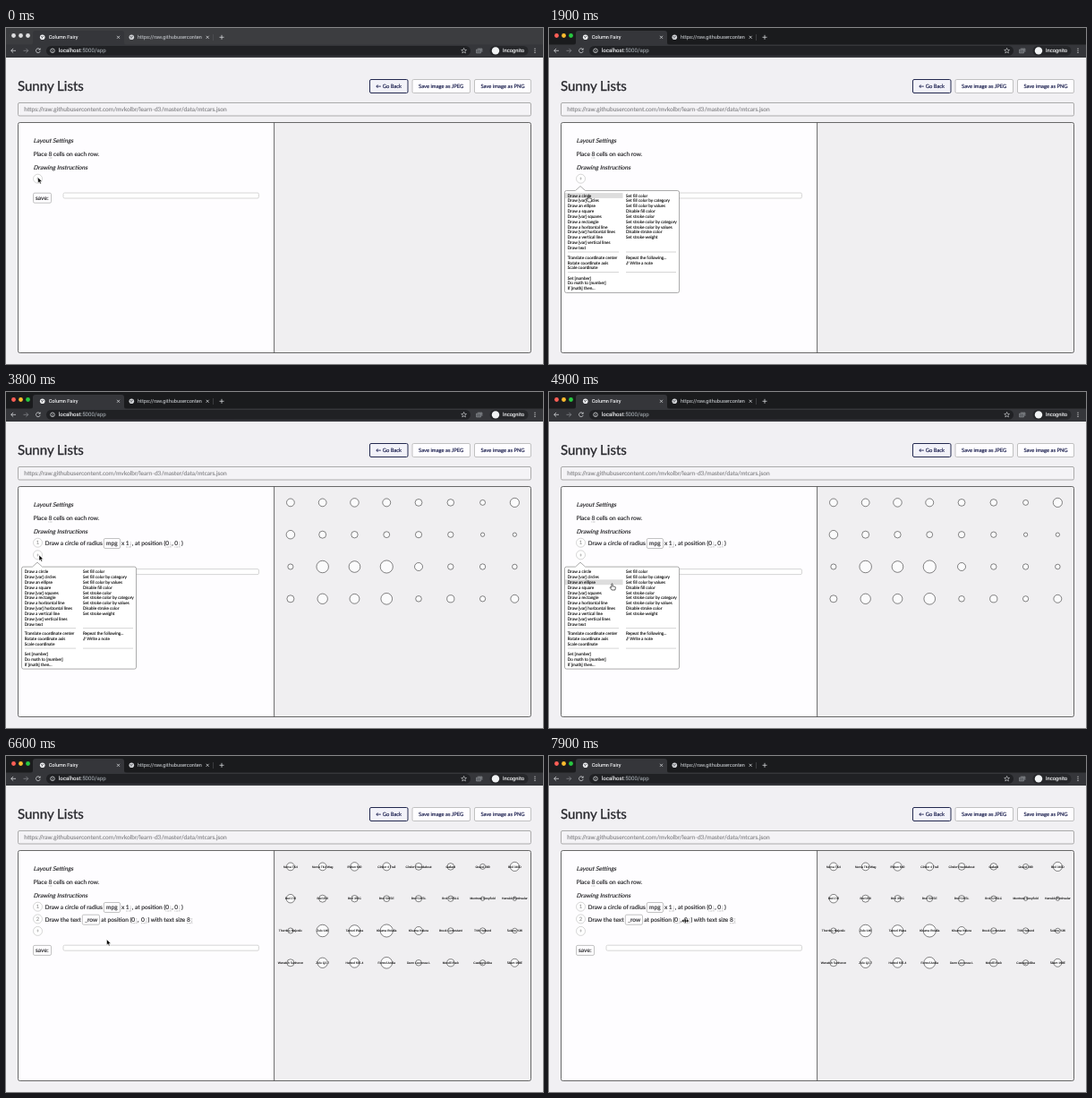
Write an HTML page that moves like this. It is 600x375 px and loops after 8 s.

```html
<!DOCTYPE html>
<html lang="en">
<head>
<meta charset="utf-8">
<title>Column Fairy</title>
<style>
  html, body { margin: 0; width: 100%; height: 100%; overflow: hidden; background: #f1f0f3; }
  svg { display: block; width: 600px; height: 375px; }
  text {
    font: 6.62px Lato, sans-serif; color: #1c1c1f; fill: currentColor; stroke: currentColor; stroke-width: .12;
    text-rendering: geometricPrecision; white-space: pre;
  }
  .ui text { font: 5.6px Roboto, sans-serif; color: #f1f2f4; }
  .ui .dim { fill: #9aa0a6; stroke: #9aa0a6; }
  .ui .addr { font-size: 6.1px; }
  .icon { fill: none; stroke: #d5d7da; stroke-width: .8; }
  .title { font-size: 15px; color: #26262b; stroke-width: .3; }
  .button { font-size: 5.833px; color: #1d2150; text-anchor: middle; stroke-width: .18; }
  .head { transform: skewX(-14deg); transform-box: fill-box; transform-origin: 0 80%; }
  .box { fill: #fefdff; stroke: #aaa; stroke-width: .7; }
  .ring { fill: #fff; stroke: #bbb; stroke-width: .6; }
  .mark { color: #999; font-size: 6px; text-anchor: middle; }
  .under { stroke: #777; stroke-width: .6; stroke-dasharray: .7 .7; }
  #menu text { font-size: 4.667px; color: #111; }
  #circles circle { fill: #fbfbfc; stroke: #222; stroke-width: .55; }
  #labels text { font: 3.333px "Liberation Sans", Arial, sans-serif; color: #000; text-anchor: middle; stroke-width: .08; }
</style>
</head>
<body>
<svg viewBox="0 0 600 375">
  <g class="ui">
    <rect id="bar" width="600" height="19"/>
    <path d="M27 19q3 0 3-3V6q0-3 3-3h96q3 0 3 3v10q0 3 3 3z" fill="#35363a"/>
    <rect y="18.5" width="600" height="14.5" fill="#35363a"/>
    <g id="lights"><circle cx="8.5" cy="8.5" r="2.4"/><circle cx="16.5" cy="8.5" r="2.4"/><circle cx="24.5" cy="8.5" r="2.4"/></g>
    <circle cx="40.7" cy="10.3" r="2.8" fill="#f1f2f4"/><circle cx="140.3" cy="10.3" r="2.8" fill="#d4d6d9"/>
    <path d="M39 9.4l1.6.6-.4 1.6M42 8.8l-.6 1.2M138.6 9.4l1.6.6-.4 1.6M141.6 8.8l-.6 1.2" fill="none" stroke="#45474c" stroke-width=".8"/>
    <text x="47.7" y="12.3">Column Fairy</text>
    <text x="147" y="12.3" style="color:#b4b7bb">https://raw.githubuserconten</text>
    <path class="icon" d="M124 8.8l3 3m0-3l-3 3M223.700 8.800l3 3m0-3l-3 3M238.500 10.300h5m-2.500-2.500v5"/>
    <path d="M231.500 7v7" stroke="#5a5c60" stroke-width=".5"/>
    <path class="icon" d="M11 25.300H5.700m2.400-2.400l-2.400 2.400 2.400 2.400M37.800 23.800a2.400 2.400 0 1 0 .4 2M38.200 22.600v1.600h-1.600"/>
    <path class="icon" style="stroke:#85878c" d="M19.500 25.300h5.300m-2.400-2.400l2.400 2.400-2.400 2.400"/>
    <rect x="45" y="20" width="474" height="10.800" rx="5.400" fill="#202124"/>
    <circle class="icon" cx="52" cy="25.300" r="2.300"/><path class="icon" d="M52 25v1.500M52 23.700v.5"/>
    <text class="addr" x="58.800" y="27.400">localhost<tspan class="dim">:5000/app</tspan></text>
    <path class="icon" style="stroke-width:.6" d="M511.600 22.400l.8 2 2.100.1-1.600 1.400.5 2.100-1.800-1.200-1.800 1.200.5-2.100-1.600-1.400 2.100-.1z"/>
    <path d="M526.800 23h5.200v3.800M525.500 24h5v4h-5z" fill="#5f6267" stroke="#8a8d92" stroke-width=".6"/>
    <rect x="540.500" y="20" width="43" height="10.800" rx="5.400" fill="#26272a"/>
    <circle cx="547" cy="25.400" r="4.200" fill="#f1f3f4"/>
    <text x="555" y="27.400" style="font-size:5.800px">Incognito</text>
    <g fill="#e4e5e7"><circle cx="591" cy="23.200" r=".6"/><circle cx="591" cy="25.300" r=".6"/><circle cx="591" cy="27.400" r=".6"/></g>
  </g>

  <text class="title" x="13" y="70.300">Sunny Lists</text>
  <rect x="406.500" y="57.500" width="42.500" height="15" rx="1.500" fill="#f2f2f9" stroke="#23284f"/>
  <rect class="box" x="454" y="57.500" width="64.500" height="15" rx="1.500"/>
  <rect class="box" x="523.500" y="57.500" width="63" height="15" rx="1.500"/>
  <text class="button" x="427.700" y="67">← Go Back</text>
  <text class="button" x="486.200" y="67">Save image as JPEG</text>
  <text class="button" x="555" y="67">Save image as PNG</text>
  <rect x="13.500" y="83.500" width="573" height="14.500" rx="1.500" fill="#f4f3f6" stroke="#999" stroke-width=".8"/>
  <text x="20.300" y="93.200" style="color:#858588">https://raw.githubusercontent.com/mvkolbr/learn-d3/master/data/mtcars.json</text>

  <rect x="13.500" y="105.500" width="573" height="257" rx="2" fill="#f0eff1"/>
  <path d="M299.600 105.500H15.500q-2 0-2 2V360.500q0 2 2 2H299.600z" fill="#fefdff"/>
  <rect x="13.500" y="105.500" width="573" height="257" rx="2" fill="none" stroke="#444" stroke-width=".8"/>
  <path d="M299.600 105.500v257" stroke="#444" stroke-width=".8"/>
  <text class="head" x="30.500" y="128.200">Layout Settings</text>
  <text x="30.500" y="143.300">Place 8 cells on each row.</text>
  <path class="under" d="M47.500 145h4.500"/>
  <text class="head" x="30.500" y="158.300">Drawing Instructions</text>

  <g id="step1">
    <circle class="ring" cx="35.500" cy="168.200" r="5"/><text class="mark" x="35.500" y="170.400">1</text>
    <rect class="box" x="109.300" y="163.500" width="18.200" height="11" rx="1.500"/>
    <text y="171.300"><tspan x="43.500">Draw a circle of radius</tspan><tspan x="112">mpg</tspan><tspan x="129">x</tspan><tspan x="133.800">1</tspan><tspan x="140.800">, at position (</tspan><tspan x="178.300">0</tspan><tspan x="185.300">,</tspan><tspan x="188.300">0</tspan><tspan x="196">)</tspan></text>
    <path class="under" d="M134 173h6M178.500 173h6M188.500 173h6M139.300 167.500v5M183.800 167.500v5M193.800 167.500v5"/>
  </g>
  <g id="step2">
    <circle class="ring" cx="35.500" cy="181.900" r="5"/><text class="mark" x="35.500" y="184.100">2</text>
    <rect class="box" x="85.300" y="177.200" width="19.200" height="11" rx="1.500"/>
    <text y="185"><tspan x="43.500">Draw the text</tspan><tspan x="88">_row</tspan><tspan x="106.300">at position (</tspan><tspan x="140.300">0</tspan><tspan x="147">,</tspan><tspan x="151">0</tspan><tspan x="158.500">) with text size</tspan><tspan x="202">8</tspan></text>
    <path class="under" d="M140.500 186.700h6M151.300 186.700h6M202.300 186.700h6M145.800 181.200v5M156.700 181.200v5M207.600 181.200v5"/>
  </g>
  <g id="tail">
    <circle class="ring" cx="35.500" cy="168.200" r="5"/><text class="mark" x="35.500" y="170.300">+</text>
    <rect class="box" x="30.500" y="184.200" width="20" height="11" rx="1.500"/><text x="33" y="191.800">save:</text>
    <rect x="64" y="184" width="218.500" height="6" rx="1.500" fill="#fff" stroke="#ccc" stroke-width=".8"/>
  </g>
  <g id="circles"></g>
  <g id="labels"></g>
  <g id="menu">
    <path d="M19.500 181.500H29.500L35 176.500 40.500 181.500H143.500q2 0 2 2V293.500q0 2-2 2H19.500q-2 0-2-2V183.500q0-2 2-2z" fill="#fff" stroke="#888" stroke-width=".7"/>
    <rect id="hover" x="18" width="64.500" height="5.833" fill="#ddd"/>
    <path d="M21 250h57M86 250h56M21 272.500h57M86 272.500h56" stroke="#bbb" stroke-width=".6"/>
  </g>
  <g id="cursor" stroke-linejoin="round">
    <path id="arrow" d="M0 0V6.300L1.500 5 2.500 7.300 3.600 6.800 2.600 4.600H4.600z" stroke="#fff" stroke-width=".5"/>
    <path id="hand" d="M-.6 .3Q0-.5 .6 .3V2.800L3.500 3.400Q4 3.600 3.900 4.300L3.300 7H-.4L-2.300 4.300Q-2.300 3.400-1.400 3.600L-.6 4.300z" fill="#fff" stroke="#000" stroke-width=".6"/>
    <path id="resize" d="M-4 0L-1.800-2V-.6H-.6V-2.600H.6V-.6H1.800V-2L4 0 1.800 2V.6H.6V2.600H-.6V.6H-1.800V2z" stroke="#fff" stroke-width=".3"/>
  </g>
</svg>
<script>
const $ = id => document.getElementById(id);
const add = (parent, tag, attrs, text = '') => {
  const el = document.createElementNS('http://www.w3.org/2000/svg', tag);
  for (const k in attrs) el.setAttribute(k, attrs[k]);
  el.textContent = text;
  $(parent).append(el);
};
const show = (id, on) => $(id).style.display = on ? '' : 'none';
const move = (id, x, y) => $(id).setAttribute('transform', `translate(${x} ${y})`);

const ROW = 5.833, STEP = 13.6, MENU_TOP = 184.1;
const column = (x, y, items) => items.split('|').forEach((s, i) => add('menu', 'text', { x, y: y + i * ROW }, s));
column(20.8, 188.6, 'Draw a circle|Draw [var] circles|Draw an ellipse|Draw a square|Draw [var] squares|Draw a rectangle|Draw a horizontal line|Draw [var] horizontal lines|Draw a vertical line|Draw [var] vertical lines|Draw text');
column(86, 188.6, 'Set fill color|Set fill color by category|Set fill color by values|Disable fill color|Set stroke color|Set stroke color by category|Set stroke color by values|Disable stroke color|Set stroke weight');
column(20.8, 257.8, 'Translate coordinate center|Rotate coordinate axis|Scale coordinate');
column(86, 257.8, 'Repeat the following...|// Write a note');
column(20.8, 280.5, 'Set [number]|Do math to [number]|If [math] then...');

const mpg = [21, 21, 22.8, 21.4, 18.7, 18.1, 14.3, 24.4, 22.8, 19.2, 17.8, 16.4, 17.3, 15.2, 10.4, 10.4,
  14.7, 32.4, 30.4, 33.9, 21.5, 15.5, 15.2, 13.3, 19.2, 27.3, 26, 30.4, 15.8, 19.7, 15, 21.4];
const names = ('Norva TK4|Norva TK4 Wag|Pelton 640|Cinder 4 Trail|Cinder Roundabout|Gallard|Gravel 280|Brel 310D|' +
  'Brel 270|Brel 350|Brel 350C|Brel 520SE|Brel 520SL|Brel 520SLC|Montrose Greyfield|Harwick Peninsular|' +
  'Thornley Majestic|Zelo 146|Tamori Plaza|Kisuma Petalia|Kisuma Halora|Brock Contestant|TVK Halberd|Solano Y36|' +
  'Wenatch Sunheron|Zelo Q2-7|Hartzel 635-4|Fennel Arctia|Dunn Leonessa L|Morelli Puck|Castagni Alba|Skarn 168E').split('|');
mpg.forEach((v, i) => {
  const x = 317.9 + i % 8 * 35.78, y = 123.4 + Math.floor(i / 8) * 35.8;
  add('circles', 'circle', { cx: x, cy: y, r: v * .2083 });
  add('labels', 'text', { x, y: y + 1.1 }, names[i]);
});

// Cursor stops: time, x, y
const path = [[0, 35.7, 166.7], [800, 35.7, 166.7], [1400, 44, 187], [2000, 44, 187], [2700, 62, 192], [2900, 62, 192],
  [3500, 37, 182], [4100, 37, 182], [4600, 66, 208], [4800, 70.5, 214], [4900, 70.5, 214], [5200, 66, 259.5],
  [6000, 66, 259.5], [6500, 112.5, 204.7], [6900, 112.5, 204.7], [7800, 151, 179.5], [7900, 152.3, 184], [8000, 152.3, 184]];
function cursorAt(t) {
  const i = path.findIndex(p => p[0] > t);
  const [t0, x0, y0] = path[i - 1], [t1, x1, y1] = path[i];
  const u = (t - t0) / (t1 - t0), e = u * u * (3 - 2 * u);
  return [x0 + (x1 - x0) * e, y0 + (y1 - y0) * e];
}

function draw(now) {
  const t = Math.floor(now % 8000 / 100) * 100;
  const focus = Math.min(t / 200, 1);
  const mix = (a, b) => `rgb(${a.map((v, i) => v + (b[i] - v) * focus)})`;
  $('bar').style.fill = mix([60, 61, 64], [26, 27, 29]);
  [[255, 95, 87], [254, 188, 46], [40, 200, 64]].forEach((c, i) =>
    $('lights').children[i].style.fill = mix([222, 222, 224], c));

  const steps = (t >= 2000) + (t >= 5600), shift = steps * STEP;
  const open = t >= 700 && t < 2000 || t >= 3700 && t < 5600;
  show('step1', steps > 0);
  show('circles', steps > 0);
  show('step2', steps > 1);
  show('labels', steps > 1);
  show('menu', open);
  move('tail', 0, shift);
  move('menu', 0, shift);

  const [x, y] = cursorAt(t);
  const row = Math.floor((y - MENU_TOP - shift) / ROW);
  const hovering = open && row >= 0 && row < 11;
  show('hover', hovering);
  $('hover').setAttribute('y', MENU_TOP + row * ROW);
  move('cursor', x, y);
  show('hand', hovering);
  show('resize', t >= 7900);
  show('arrow', !hovering && t < 7900);
  requestAnimationFrame(() => draw(performance.now()));
}
draw(performance.now());
</script>
</body>
</html>
```
